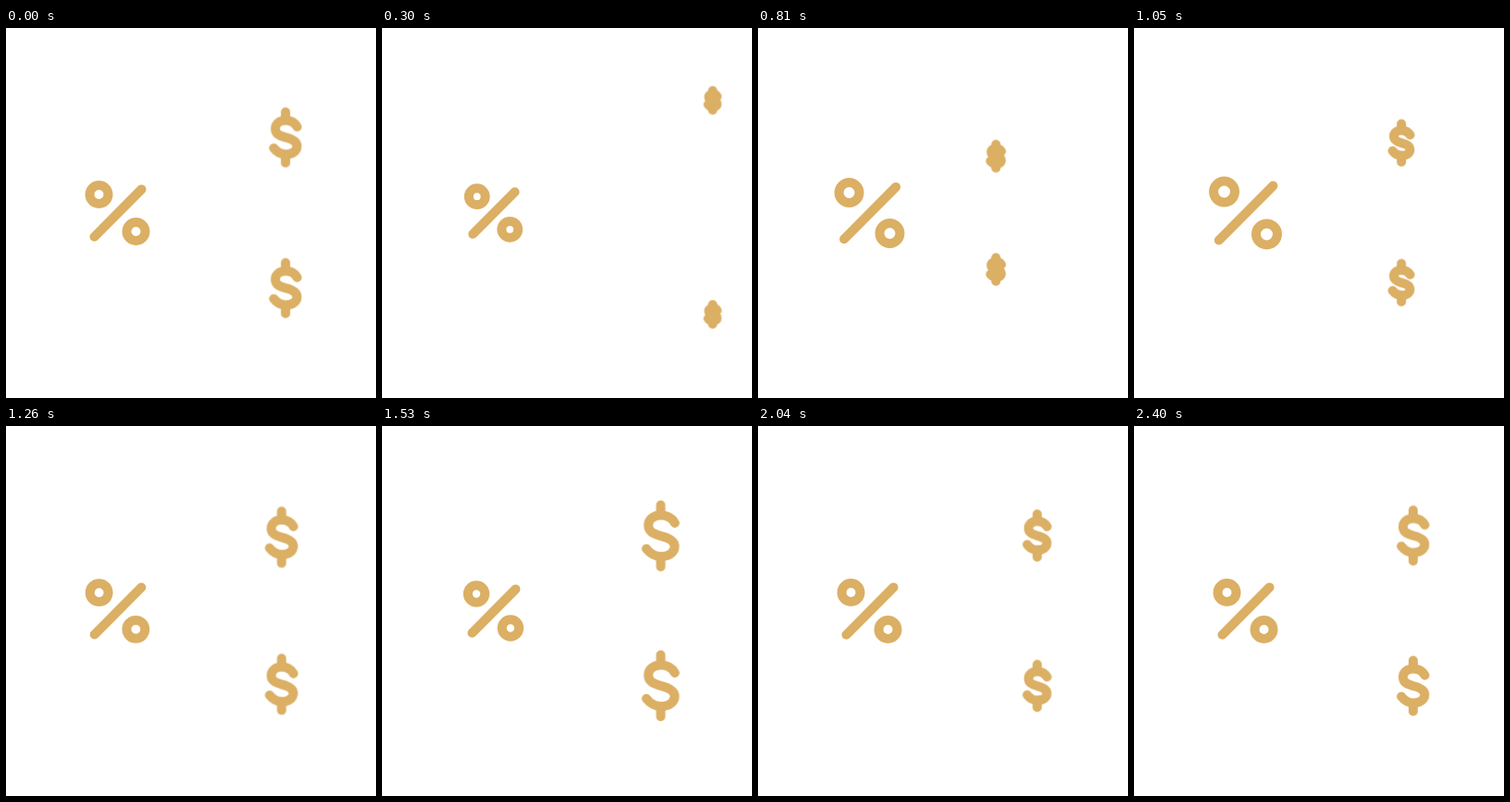
An HTML page that plays this animation: 400x400 px, repeating every 4430 ms.

```html
<!DOCTYPE html>
<html lang="en">
<head>
<meta charset="utf-8">
<title>Percent and dollars</title>
<style>
  html, body { margin: 0; width: 100%; height: 100%; overflow: hidden; background: #fff; }
  svg { display: block; width: 100%; height: 100%; }

  /* line weight stays the same while the shapes grow and shrink */
  path, circle {
    fill: none;
    stroke: #dbaf64;
    stroke-width: 10;
    stroke-linecap: round;
    stroke-linejoin: round;
    vector-effect: non-scaling-stroke;
  }

  .percent, .dollar {
    transform-origin: 0 0;
    animation: 4430ms linear infinite;
  }
  .percent {
    translate: 120.5px 200px;
    animation-name: pulse;
    animation-timing-function: cubic-bezier(.37, 0, .63, 1);
  }
  .dollar { animation-name: fly, grow, blink; }
  .upper { --home: 301.8px 118.5px; --exit: 362px 75px; }
  .lower { --home: 301.8px 281px; --exit: 362px 312px; }

  @keyframes pulse {
    0% { scale: 1; }
    10.835% { scale: .84; }
    21.67% { scale: 1.17; }
    32.506% { scale: .915; }
    43.34%, 100% { scale: 1; }
  }

  /* out to the right, then back from the middle of the percent sign */
  @keyframes fly {
    0% { translate: var(--home); animation-timing-function: cubic-bezier(.25, .7, .5, 1); }
    10.835% { translate: var(--exit); animation-timing-function: step-end; }
    12.19% { translate: 121px 200px; animation-timing-function: cubic-bezier(.16, 1, .3, 1); }
    42.664%, 100% { translate: var(--home); }
  }

  @keyframes grow {
    0% { scale: 1; }
    10.835% { scale: .01; }
    18.284% { scale: .46; }
    23.702% { scale: .745; }
    32.506% { scale: 1.25; animation-timing-function: cubic-bezier(.37, 0, .63, 1); }
    43.34% { scale: .82; animation-timing-function: cubic-bezier(.37, 0, .63, 1); }
    54.176%, 100% { scale: 1; }
  }

  @keyframes blink {
    0% { opacity: 1; animation-timing-function: step-end; }
    10.835% { opacity: 0; animation-timing-function: step-end; }
    12.7%, 100% { opacity: 1; }
  }
</style>
</head>
<body>
<svg viewBox="0 0 400 400">
  <defs>
    <g id="dollar">
      <path d="M0-27.5V-19M0 19V27.5"/>
      <path d="M12.6-11.5C10-16 5.5-18.4 0-18.4C-6.5-18.4-11-14.5-11-9.5C-11-4-7-2 0 0C8 2 12.4 4.5 12.4 9.5C12.4 15 7 18.4 .5 18.4C-5 18.4-9.5 15.8-12.8 11.5"/>
    </g>
  </defs>
  <g class="percent">
    <circle cx="-20" cy="-20" r="10"/>
    <circle cx="20" cy="20" r="10"/>
    <path d="M-25 25.7L26-25.6"/>
  </g>
  <g class="dollar upper"><use href="#dollar"/></g>
  <g class="dollar lower"><use href="#dollar"/></g>
</svg>
</body>
</html>
```
